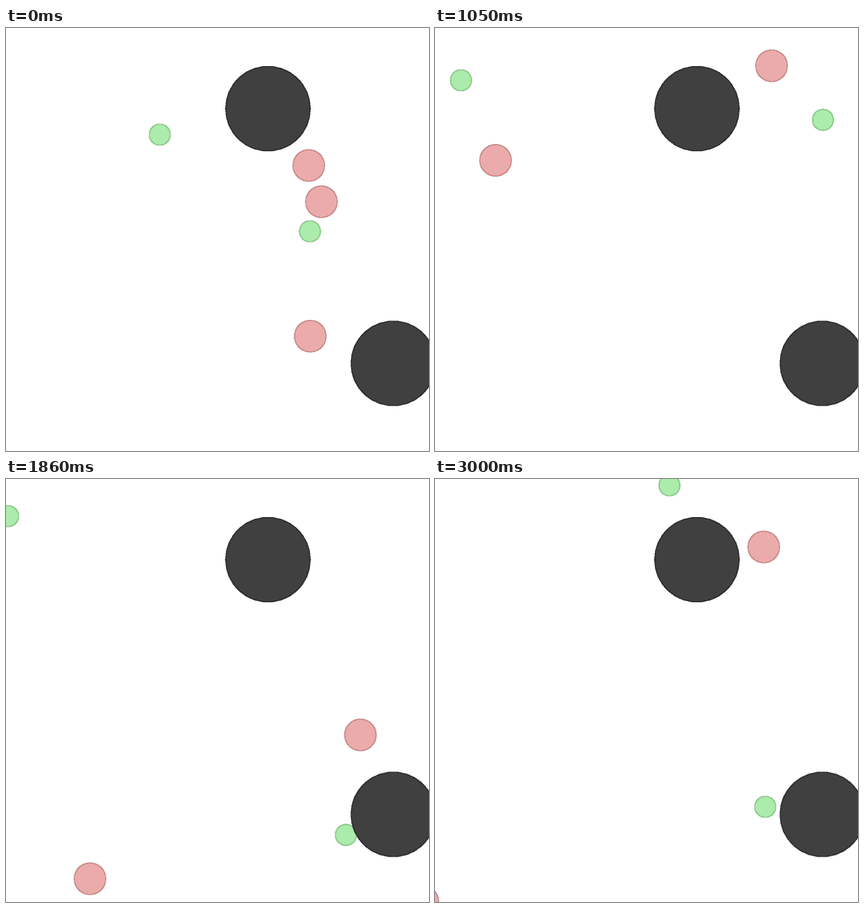
A matplotlib script that plays this animation: 700 by 700 pixels, repeating every 3.03 s.

```python
import numpy as np
import matplotlib.pyplot as plt
from matplotlib.animation import FuncAnimation
from matplotlib.patches import Polygon

SIZE, DPI = 700, 100
FRAMES, STEP_MS = 101, 30
RED, GREEN, DARK = (0.85, 0.35, 0.35), (0.35, 0.85, 0.35), (0.25, 0.25, 0.25)
CHASER_R, RUNNER_R, ROCK_R = 26.25, 17.5, 70
OVERLAP = 3  # how far an agent may sink into a rock

ROCKS = [(433, 133), (640.5, 554.5)]

# Steps at which agents change course, and where they are then
TURNS = np.array([0, 20, 35, 51, 62, 82, 100])
CHASERS = [
    [(500.5, 227), (110.5, 127), (556.5, 62), (634, 330),
     (586, 423), (531, 155.5), (543.5, 112)],
    [(521.5, 287), (26, 119), (99.7, 218.5), (90, 521),
     (138.5, 661), (55.5, 525), (-20.5, 699)],
    [(503, 509.5), (-90, 420)],
]
RUNNERS = [
    [(254, 176), (35.5, 20.5), (42.5, 86), (21, 113),
     (3, 61), (56.5, 31.5), (387.5, 10)],
    [(502.5, 336), (81, 17), (641.5, 151.5), (618.5, 436.5),
     (562, 588.5), (565, 419), (546, 542)],
]


def glide(points):
    """Path through the points from rest, without overshoot on either axis."""
    xy = np.array(points, float)
    t = TURNS[:len(xy)]
    h = np.diff(t)[:, None]
    d = np.diff(xy, axis=0) / h
    a, b = d[:-1], d[1:]
    v = np.zeros_like(xy)
    v[1:-1] = np.where(a * b > 0, 2 * a * b / (a + b + 1e-12), 0)
    v[-1] = d[-1]

    s = np.clip(np.arange(FRAMES), t[0], t[-1])
    i = np.clip(np.searchsorted(t, s, side="right") - 1, 0, len(t) - 2)
    u = (s - t[i])[:, None] / h[i]
    w = 1 - u
    return (w * w * ((1 + 2 * u) * xy[i] + u * h[i] * v[i])
            + u * u * ((1 + 2 * w) * xy[i + 1] - w * h[i] * v[i + 1]))


def avoid(path, r):
    """Push the path out of the rocks."""
    for rock in ROCKS:
        off = path - rock
        dist = np.linalg.norm(off, axis=1, keepdims=True)
        path = rock + off * np.maximum(1, (ROCK_R + r - OVERLAP) / dist)
    return path


def ring(r, sides=30):
    a = np.linspace(0, 2 * np.pi, sides, endpoint=False)
    return r * np.column_stack([np.cos(a), np.sin(a)])


fig = plt.figure(figsize=(SIZE / DPI, SIZE / DPI), dpi=DPI, facecolor="white")
ax = fig.add_axes([0, 0, 1, 1])
ax.set_xlim(-0.5, SIZE - 0.5)
ax.set_ylim(SIZE - 0.5, -0.5)
ax.axis("off")


def disc(r, color, alpha, center=(0, 0)):
    rim = tuple(c / 2 for c in color)
    patch = Polygon(ring(r) + center, closed=True, facecolor=(*color, alpha),
                    edgecolor=(*rim, alpha / 2), linewidth=1.2 * 72 / DPI,
                    antialiased=False)
    return ax.add_patch(patch)


movers = []
for group, r, color in [(CHASERS, CHASER_R, RED), (RUNNERS, RUNNER_R, GREEN)]:
    for points in group:
        movers.append((disc(r, color, 0.5), ring(r), avoid(glide(points), r)))
for spot in ROCKS:
    disc(ROCK_R, DARK, 1, spot)


def update(k):
    for patch, shape, path in movers:
        patch.set_xy(shape + path[k])
    return [m[0] for m in movers]


anim = FuncAnimation(fig, update, frames=FRAMES, interval=STEP_MS,
                     repeat=True, repeat_delay=0, blit=False)
plt.show()
```
